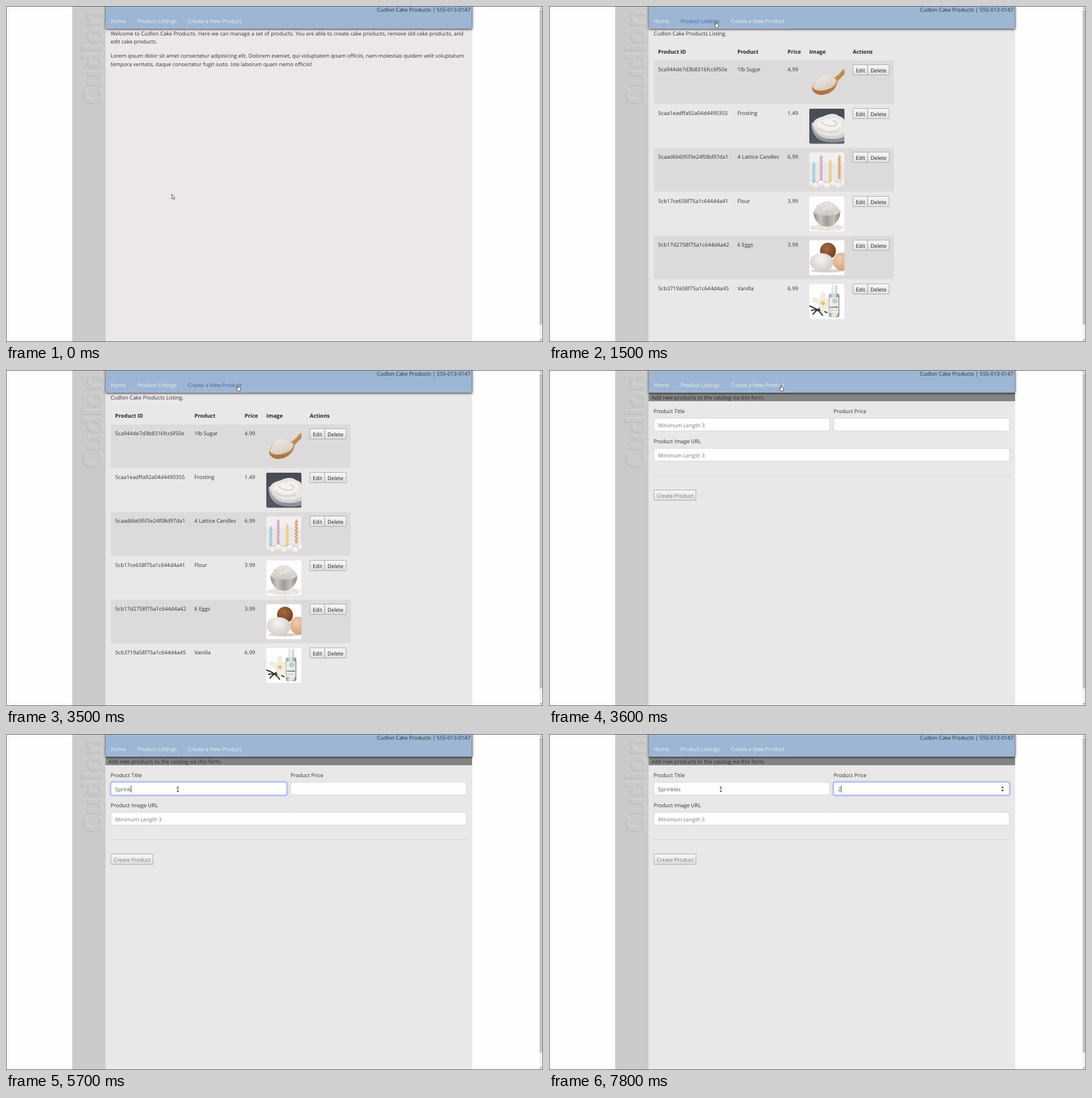
An HTML page with a canvas that plays this animation: 947 by 592 pixels, repeating every 8000 ms.

```html
<!DOCTYPE html>
<html lang="en">
<head>
<meta charset="utf-8">
<title>Cake product manager</title>
<style>
html, body { margin: 0; width: 100%; height: 100%; overflow: hidden; background: #fff; }
canvas { display: block; width: 947px; height: 592px; }
</style>
</head>
<body>
<canvas id="stage" width="947" height="592"></canvas>
<script>
const ctx = document.getElementById('stage').getContext('2d');
const LOOP = 8000;
const BRAND = 'Cudlon';
const FAMILY = '"Open Sans", "Noto Sans", sans-serif';
const INK = '#303034';
const MUTED = '#747b84';

// time, x, y, pointer shape
const POINTER = [
  [0, 292, 331, 'arrow'], [700, 294, 290, 'arrow'], [900, 298, 120, 'arrow'],
  [1000, 295, 52, 'arrow'], [1200, 294, 27, 'hand'], [1900, 305, 55, 'arrow'],
  [2100, 330, 130, 'arrow'], [2300, 375, 215, 'arrow'], [2500, 400, 260, 'arrow'],
  [2800, 405, 200, 'arrow'], [3000, 408, 110, 'arrow'], [3200, 409, 45, 'arrow'],
  [3500, 408.5, 26, 'hand'], [3900, 360, 62, 'arrow'], [4000, 303, 97, 'beam']
];
const TITLE = [[0, ''], [5000, 'S'], [5400, 'Sp'], [5500, 'Spri'], [5700, 'Sprink'], [5900, 'Sprinkles']];
const PRICE = [[0, ''], [7800, '2']];
const CARET = [[0, 0], [4300, 1], [4800, 0], [5000, 1], [6300, 0], [6700, 1], [7200, 0], [7600, 1]];

const PRODUCTS = [
  ['5ca944de7d3b8316fcc6f50e', '1lb Sugar', '4.99', drawSugar],
  ['5caa1eadffa92a04d4490355', 'Frosting', '1.49', drawFrosting],
  ['5caad6b695f3e24f08d97da1', '4 Lattice Candles', '6.99', drawCandles],
  ['5cb17ce658f75a1c644d4a41', 'Flour', '3.99', drawFlour],
  ['5cb17d2758f75a1c644d4a42', '6 Eggs', '3.99', drawEggs],
  ['5cb3719a58f75a1c644d4a45', 'Vanilla', '6.99', drawVanilla]
];

const at = (keys, t) => keys.filter(k => k[0] <= t).pop();

function rect(x, y, w, h, color) {
  ctx.fillStyle = color;
  ctx.fillRect(x, y, w, h);
}

function text(str, x, y, color = INK, weight = 400, size = 9.35) {
  ctx.font = `${weight} ${size}px ${FAMILY}`;
  ctx.fillStyle = color;
  ctx.fillText(str, x, y);
  return ctx.measureText(str).width;
}

function rounded(x, y, w, h, r, fill, stroke, width = 1) {
  ctx.beginPath();
  ctx.roundRect(x, y, w, h, r);
  paint(fill, stroke, width);
}

function paint(fill, stroke, width = 1) {
  if (fill) { ctx.fillStyle = fill; ctx.fill(); }
  if (stroke) { ctx.strokeStyle = stroke; ctx.lineWidth = width; ctx.stroke(); }
}

function oval(x, y, rx, ry, fill, turn = 0, stroke, width) {
  ctx.beginPath();
  ctx.ellipse(x, y, rx, ry, turn, 0, Math.PI * 2);
  paint(fill, stroke, width);
}

function shape(d, fill, stroke, width = 1) {
  const p = new Path2D(d);
  if (fill) { ctx.fillStyle = fill; ctx.fill(p); }
  if (stroke) { ctx.strokeStyle = stroke; ctx.lineWidth = width; ctx.stroke(p); }
}

function ramp(x0, y0, x1, y1, ...colors) {
  const g = ctx.createLinearGradient(x0, y0, x1, y1);
  colors.forEach((c, i) => g.addColorStop(i / (colors.length - 1), c));
  return g;
}

function glow(x, y, r, inner, outer) {
  const g = ctx.createRadialGradient(x, y, 0, x, y, r);
  g.addColorStop(0, inner);
  g.addColorStop(1, outer);
  return g;
}

// Product pictures, each in a 62 x 62 box
function drawSugar() {
  shape('M43 24L54 15Q58 8 63 7V16L58 20L48 31Z', ramp(48, 16, 56, 24, '#d09a62', '#b67a42'));
  shape('M5 39Q8 30 20 25L44 22Q52 25 49 34Q45 46 32 51Q17 56 9 49Q4 45 5 39Z', ramp(0, 26, 0, 54, '#cf9a63', '#a96a35'));
  shape('M6 38Q13 26 23 20Q28 16 34 19Q44 22 48 28Q46 39 33 43Q18 48 9 43Q6 41 6 38Z', ramp(20, 18, 30, 46, '#eee8e1', '#d5cbc0'));
}

function drawFrosting() {
  rect(0, 0, 62, 62, ramp(0, 0, 0, 62, '#484a54', '#555862'));
  shape('M4 25Q4 46 18 55Q34 63 62 58V22Z', ramp(0, 30, 0, 62, '#b9bbbf', '#84878e'));
  shape('M8 32Q12 48 28 52Q46 56 62 49V28Z', '#d3d3d3');
  shape('M6 27Q9 17 24 14Q42 5 52 13Q62 16 62 22V42Q50 50 32 48Q14 45 6 27Z', '#e9e6e2');
  shape('M12 27Q21 18 35 18Q50 12 56 24Q58 34 44 37Q27 42 12 27Z', '#f5f2ee');
  shape('M13 34Q30 46 52 39M21 23Q31 34 46 30Q53 25 42 21', null, '#d3cec8', 2);
}

function drawCandles() {
  rect(0, 0, 62, 62, '#f1efef');
  rect(0, 19, 62, 32, '#eae8e8');
  rect(0, 50, 62, 12, '#dedad8');
  for (let i = 0; i < 7; i++) {
    const y = 54 + (i % 2) * 4;
    oval(i * 10 + 1, y, 6, 5, '#f1eeeb', 0, '#d6d0cb', 0.7);
    oval(i * 10, y - 2, 2.4, 1.8, '#faf9f8');
  }
  [[8, 19, 52, '#8fc5e4'], [21, 7, 49, '#d79abd'], [37, 16, 52, '#ebc76e'], [53, 7, 47, '#d99b65']]
    .forEach(([x, top, end, color]) => {
      rect(x - 2.3, top, 4.6, end - top, color);
      for (let y = top + 2, n = 0; y < end - 1; y += 3, n++) {
        oval(x + (n % 2 ? 1.1 : -1.1), y, 1, 1, '#f4ebe6');
      }
      rect(x - 0.4, top - 3, 0.8, 3, '#a19589');
    });
}

function drawFlour() {
  rect(0, 0, 62, 62, '#fdfdfd');
  oval(31, 55, 30, 6, '#e9e5e0');
  for (let i = 0; i < 24; i++) oval((i * 23) % 62, 51 + (i * 7) % 9, 1.4, 0.8, i % 2 ? '#d3cdc5' : '#f6f4f1');
  shape('M7 27Q8 43 20 51Q31 56 42 51Q54 43 55 27Z', ramp(7, 0, 55, 0, '#8f8c89', '#c9c6c2', '#a09c98', '#c4c1bd', '#8b8783'));
  shape('M7 28Q11 20 16 17Q20 9 31 8Q41 9 45 15Q53 20 55 28Q47 35 31 34Q13 35 7 28Z', ramp(0, 8, 0, 35, '#e9e6e2', '#cbc6c0'));
  for (let i = 0; i < 14; i++) oval(15 + (i * 19) % 32, 17 + (i * 5) % 13, 2.6, 1.5, i % 2 ? '#f1efec' : '#d2cdc7');
}

function drawEggs() {
  rect(0, 0, 62, 62, '#fff');
  oval(32, 54, 29, 3, '#d5d1ce');
  oval(33, 19, 14, 14.5, glow(31, 14, 20, '#a46b42', '#6f3d20'));
  oval(57, 38, 15, 16, glow(54, 32, 22, '#efccad', '#d3a27c'), -0.3);
  oval(22, 39, 21, 16, glow(20, 33, 24, '#f8f6f3', '#d2cdc8'), 0.05);
}

function drawVanilla() {
  rect(0, 0, 62, 62, '#fdfdfc');
  shape('M0 39Q15 43 24 56M3 47Q16 43 32 51M6 54Q15 43 24 41', null, '#3a3632', 2.2);
  [[14, 30, 0.5], [24, 24, 1.6], [32, 30, 2.6], [22, 42, 1.2], [30, 39, 0.7]].forEach(([x, y, a]) => {
    oval(x, y, 9, 3.8, '#f3eedb', a, '#dbd3b8', 0.6);
  });
  oval(24, 34, 3.6, 3, '#dfc07a', 0.6);
  rounded(39.5, 2, 9.5, 16, 2, ramp(39, 0, 49, 0, '#d2d6da', '#fafafa', '#bdc3c8'));
  rounded(34.5, 17, 18.5, 42, 4, ramp(34, 0, 53, 0, '#8d979d', '#e3e7e8', '#78838b'));
  rect(35.5, 24, 16, 27, '#edefed');
  oval(45, 30, 5, 4.4, '#c3cdb9');
  text('vanilla', 36, 42, '#3c403b', 700, 4.4);
  rect(36, 46, 14, 1, '#a9b2a5');
  oval(45, 54, 6, 3, '#eee7cd', -0.5);
}

function drawWindow(t) {
  rect(0, 0, 947, 592, '#fefefe');
  rect(116.7, 0, 59.3, 592, '#cbcaca');
  rect(175.5, 0, 646.5, 592, t < 100 ? '#ece7eb' : '#e9e7e8');
  ctx.save();
  ctx.translate(170, 174);
  ctx.rotate(-Math.PI / 2);
  text(BRAND, -1, -1, '#b9b8b8', 700, 48);
  text(BRAND, 1, 1, '#dad9d9', 700, 48);
  text(BRAND, 0, 0, '#cac9c9', 700, 48);
  ctx.restore();
}

function drawFrame() {
  rect(941, 1, 5, 590, '#f0f0f0');
  rect(941, 7, 5, 554, '#c2c2c2');
  shape('M941.8 4.5L943.5 2.5L945.2 4.5Z', '#555');
  shape('M941.8 587.5L943.5 589.5L945.2 587.5Z', '#555');
  rect(0, 0, 947, 1, '#5c5c5e');
  rect(0, 591, 947, 1, '#5c5c5e');
  rect(0, 0, 1, 592, '#5c5c5e');
  rect(946, 0, 1, 592, '#6a6a6c');
}

function drawNav(hover) {
  ctx.save();
  ctx.shadowColor = 'rgba(0,0,0,.85)';
  ctx.shadowBlur = 4;
  ctx.shadowOffsetY = 1;
  rect(176, -10, 645.5, 50, '#9cb6d4');
  ctx.restore();
  rect(180, 39, 246, 0.8, '#b3c5da');
  ctx.textAlign = 'right';
  text(`${BRAND} Cake Products | 555-013-0147`, 819, 10);
  ctx.textAlign = 'left';
  [['Home', 185], ['Product Listings', 231.7], ['Create a New Product', 320.8]].forEach(([label, x], i) => {
    text(label, x, 30.3, i === hover ? '#4561a0' : '#eef0f2');
  });
}

function drawHome() {
  [
    [`Welcome to ${BRAND} Cake Products. Here we can manage a set of products. You are able to create cake products, remove old cake products, and`, 51.5],
    ['edit cake products.', 66.3],
    ['Lorem ipsum dolor sit amet consectetur adipisicing elit. Dolorem eveniet, qui voluptatem ipsam officiis, nam molestias quidem velit voluptatum', 91],
    ['tempora veritatis, itaque consectetur fugit iusto. Iste laborum quam nemo officiis!', 106]
  ].forEach(([line, y]) => text(line, 184.5, y));
}

function button(label, x, y, w, color = '#222') {
  rounded(x + 0.5, y - 0.5, w - 1, 18, 0.5, ramp(0, y, 0, y + 18, '#f7f7f7', '#dedede'), '#aaa9aa');
  text(label, x + 5.4, y + 12.5, color);
}

function drawList(loaded) {
  text(`${BRAND} Cake Products Listing.`, 184.5, 51.5);
  [['Product ID', 192.3], ['Product', 332.3], ['Price', 420.8], ['Image', 459], ['Actions', 535.7]]
    .forEach(([label, x]) => text(label, x, 84, '#242427', 700, 9.45));
  if (!loaded) return;
  PRODUCTS.forEach(([id, name, price, picture], i) => {
    const y = 96 + 77.2 * i;
    const base = Math.round(y + 19);
    if (i % 2 === 0) rect(185, y, 423, 76.6, '#dcdadb');
    text(id, 192.4, base);
    text(name, 332.3, base);
    text(price, 420.8, base);
    ctx.save();
    ctx.translate(459, y + 7.6);
    ctx.beginPath();
    ctx.roundRect(0, 0, 62, 62, 3);
    ctx.clip();
    picture();
    ctx.restore();
    button('Edit', 535.5, Math.round(y + 8), 27);
    button('Delete', 561.5, Math.round(y + 8), 39);
  });
}

function field(x, y, w, value, hint, focus, caret) {
  if (focus) rounded(x - 0.5, y - 0.5, w + 1, 24.5, 4, null, `rgba(160,180,250,${0.55 * focus})`, 3);
  rounded(x + 0.5, y + 0.5, w - 1, 22.5, 3, '#fefefe', focus ? '#9aa9e6' : '#d3d5d9');
  const width = value ? text(value, x + 8, y + 16, '#50565d') : 0;
  if (!value) text(hint, x + 8, y + 16, MUTED);
  if (caret) rect(x + 8 + width, y + 6.5, 0.9, 12, '#333');
}

function drawForm(t) {
  rect(175.5, 40, 646.5, 15, '#858484');
  text('Add new products to the catalog via this form.', 180.7, 51.5, '#2a2a2c');
  text('Product Title', 184.5, 76);
  text('Product Price', 501.7, 76);
  text('Product Image URL', 184.5, 129);
  const onTitle = t >= 4300 && t < 6900;
  const onPrice = t >= 6900;
  const caret = at(CARET, t)[1];
  field(184.5, 84.5, 311, at(TITLE, t)[1], 'Minimum Length 3', onTitle ? (t < 4400 ? 0.5 : 1) : 0, onTitle && caret);
  field(501.5, 84.5, 311, at(PRICE, t)[1], '', onPrice ? 1 : 0, onPrice && caret);
  field(184.5, 137.5, 628, '', 'Minimum Length 3', 0, 0);
  if (onPrice) {
    shape('M797.3 95.2L799.8 92L802.3 95.2Z', '#444');
    shape('M797.3 98.2L799.8 101.4L802.3 98.2Z', '#444');
  }
  rect(185, 185.5, 627, 1, '#d9d7d8');
  button('Create Product', 184.5, 212, 75, '#7b7a7c');
}

function drawPointer([, x, y, kind]) {
  ctx.save();
  ctx.translate(x, y);
  if (kind === 'arrow') {
    shape('M0.5 0.5V9L2.4 7.3L3.8 10L5.1 9.4L3.9 6.8H6Z', '#fff', '#333', 0.8);
  } else if (kind === 'hand') {
    shape('M0 1Q0.8 -0.3 1.6 1V4.3L4 4.7Q5.2 5.2 5 7L4.2 11H0L-2.3 7Q-2.2 5.7 -1 6.2L0 7Z', '#fff', '#333', 0.8);
  } else {
    shape('M-1.8 -3.5H1.8M0 -3.5V4.5M-1.8 4.5H1.8', null, '#333', 1);
  }
  ctx.restore();
}

function draw() {
  const t = performance.now() % LOOP;
  ctx.textRendering = 'geometricPrecision';
  drawWindow(t);
  if (t < 1400) drawHome();
  else if (t < 3600) drawList(t >= 1500);
  else drawForm(t);
  const pointer = at(POINTER, t);
  const hover = t >= 3600 || pointer[3] !== 'hand' ? -1 : pointer[1] < 310 ? 1 : 2;
  drawNav(hover);
  drawFrame();
  drawPointer(pointer);
  requestAnimationFrame(draw);
}

draw();
</script>
</body>
</html>
```
